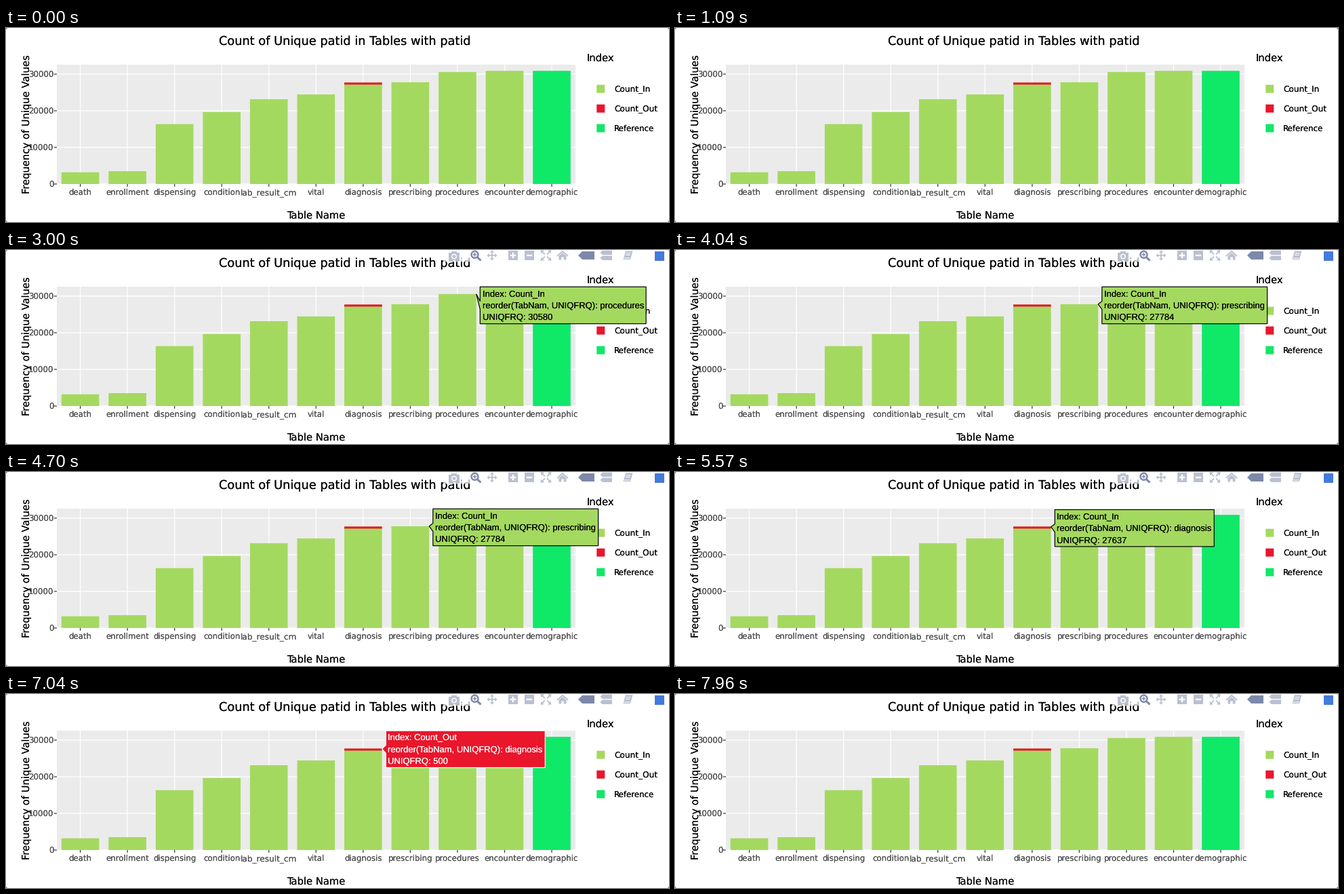
A matplotlib script for the animation above (8000 ms loop, 978 px wide and 286 px high).

```python
import matplotlib.pyplot as plt
from matplotlib.animation import FuncAnimation
from matplotlib.patches import Circle, FancyBboxPatch, Polygon, Rectangle

W, H, DPI = 978, 286, 64
PT = 72 / DPI  # points per pixel
STEP, LOOP = 40, 8000

LIME, RED, GREEN = "#a4d960", "#e9162c", "#10e868"
INK, TICK = "#000000", "#4d4d4d"
SOFT, ACTIVE, BLUE = "#b9c0d0", "#7d89aa", "#447adb"

LEFT, RIGHT, TOP, BASE = 75, 840, 54, 230
SLOT = (RIGHT - LEFT) / 11
BAR_W = 0.8 * SLOT
UNIT = 162 / 30000  # pixels per counted value
TITLE, AXIS, LABEL, LEGEND = 17.78, 14.8, 11.8, 12.1  # text sizes in pixels

plt.rcParams["text.hinting"] = "none"
plt.rcParams["font.family"] = "DejaVu Sans"

fig = plt.figure(figsize=(W / DPI, H / DPI), dpi=DPI, facecolor="#777777")
ax = fig.add_axes([0, 0, 1, 1])
ax.set_xlim(0, W)
ax.set_ylim(H, 0)
ax.axis("off")


def rect(x0, y0, x1, y1, color, z=1):
    return ax.add_patch(Rectangle((x0, y0), x1 - x0, y1 - y0, fc=color, lw=0,
                                  zorder=z, snap=False))


def poly(points, color, z=1, edge="none", lw=0):
    return ax.add_patch(Polygon(points, fc=color, ec=edge, lw=lw * PT, zorder=z, joinstyle="miter"))


def line(xs, ys, color, lw, z=1):
    return ax.plot(xs, ys, color=color, lw=lw * PT, zorder=z, solid_capstyle="butt", snap=False)[0]


def text(x, y, s, px, color=INK, ha="left", z=4, **kw):
    # Two passes firm up the antialiased strokes.
    return [ax.text(x, y, s, fontsize=px * PT, color=color, ha=ha, va="baseline", zorder=z, **kw)
            for _ in range(2)]


def value_y(v):
    return BASE - v * UNIT


def centre(i):
    return LEFT + (i + 0.5) * SLOT - 0.2


# ---- chart ----
ax.add_patch(FancyBboxPatch((0, 0), W, H, boxstyle="round,pad=0,rounding_size=3.5",
                            fc="white", lw=0, zorder=0))
rect(LEFT, TOP, RIGHT, BASE, "#ebebeb")

BARS = [("death", 3200), ("enrollment", 3500), ("dispensing", 16350),
        ("condition", 19650), ("lab_result_cm", 23150), ("vital", 24450),
        ("diagnosis", 27637), ("prescribing", 27784), ("procedures", 30580),
        ("encounter", 30900), ("demographic", 30900)]

for v in (0, 10000, 20000, 30000):
    y = value_y(v)
    line([LEFT, RIGHT], [y, y], "white", 1.33, 2)
    line([LEFT - 4, LEFT], [y, y], "#333333", 1.2, 2)
    text(70.5, y + 5, str(v), LABEL, TICK, "right")

for i, (name, count) in enumerate(BARS):
    x = centre(i)
    line([x, x], [TOP, BASE], "white", 1.33, 2)
    line([x, x], [BASE, BASE + 4], "#333333", 1.2, 2)
    color = GREEN if name == "demographic" else LIME
    rect(x - BAR_W / 2, value_y(count), x + BAR_W / 2, BASE, color, 3)
    if name == "diagnosis":
        rect(x - BAR_W / 2, value_y(count) - 0.4, x + BAR_W / 2, value_y(count - 500), RED, 3)
    text(x, 246, name, LEGEND if "_" in name else LABEL, TICK, "center")

text(500, 25, "Count of Unique patid in Tables with patid", TITLE, ha="center")
text(457.5, 281, "Table Name", AXIS, ha="center")
text(35, 243.5, "Frequency of Unique Values", AXIS, rotation=90, rotation_mode="anchor")

text(857, 49, "Index", AXIS)
for i, (name, color) in enumerate([("Count_In", LIME), ("Count_Out", RED), ("Reference", GREEN)]):
    y = 89.7 + 29 * i
    rect(871.3, y - 6, 883.3, y + 6, color)
    text(897, round(y + 4), name, LEGEND if "_" in name else LABEL)


# ---- toolbar ----
def ring(x, y, r, color, lw):
    return ax.add_patch(Circle((x, y), r, fc="none", ec=color, lw=lw * PT, zorder=6))


def plus(x, y, r, color, lw, upright=True):
    parts = [line([x - r, x + r], [y, y], color, lw, 7)]
    if upright:
        parts.append(line([x, x], [y - r, y + r], color, lw, 7))
    return parts


def arrow_head(x, y, dx, dy, size, color):
    px, py = -dy, dx
    return poly([(x, y), (x - size * (dx - px), y - size * (dy - py)),
                 (x - size * (dx + px), y - size * (dy + py))], color, 6)


def tag(x0, x1, y, half, color):
    neck = x0 + half
    return poly([(x0, y), (neck, y - half), (x1, y - half), (x1, y + half), (neck, y + half)], color, 6)


def toolbar():
    parts = [rect(645, 0, W, 17.5, "white", 5)]
    # camera
    parts += [rect(653, 4, 669, 15, SOFT, 6), rect(657, 2, 665, 5, SOFT, 6),
              ring(661, 9.5, 3.2, "white", 1.5)]
    # magnifier
    parts += [ring(691.5, 6.8, 5, ACTIVE, 2.4), line([695, 700.5], [10.5, 15.5], ACTIVE, 3, 6)]
    parts += plus(691.5, 6.8, 2.8, ACTIVE, 1.5)
    # pan
    parts += plus(717, 8, 5.5, SOFT, 1.8)
    for dx, dy in ((1, 0), (-1, 0), (0, 1), (0, -1)):
        parts.append(arrow_head(717 + 7.5 * dx, 8 + 7.5 * dy, dx, dy, 3.2, SOFT))
    # zoom in and out
    for x, upright in ((748, True), (772, False)):
        parts.append(rect(x - 7, 1, x + 7, 15, SOFT, 6))
        parts += plus(x, 8, 4.2, "white", 2.4, upright)
    # autoscale
    for sx in (-1, 1):
        for sy in (-1, 1):
            x, y = 796.5 + 7.5 * sx, 8 + 7.5 * sy
            parts.append(line([x, x - 6 * sx], [y, y - 6 * sy], SOFT, 1.8, 6))
            parts.append(poly([(x, y), (x - 5 * sx, y), (x, y - 5 * sy)], SOFT, 6))
    # home
    parts += [line([813, 821, 829], [9, 2, 9], SOFT, 2, 6),
              poly([(815.5, 9), (821, 4.3), (826.5, 9), (826.5, 14.5), (822.8, 14.5),
                    (822.8, 10.5), (819.2, 10.5), (819.2, 14.5), (815.5, 14.5)], SOFT, 6)]
    # hover modes
    parts += [tag(844, 868, 8, 6, ACTIVE), tag(876.5, 894, 4, 3.2, SOFT), tag(876.5, 894, 11.8, 3.2, SOFT)]
    # book
    parts += [poly([(914, 1.5), (924.5, 1.5), (921, 14), (910.5, 14)], SOFT, 6),
              line([914.5, 921.5], [4.8, 4.8], "white", 1, 7),
              line([913.7, 920.7], [7.4, 7.4], "white", 1, 7),
              line([911.5, 920.5], [12, 12], "white", 1, 7)]
    parts.append(rect(957, 2, 971, 16, BLUE, 6))
    return parts


# ---- hover labels ----
def hover(bar, index, count, width, mid, fill, ink):
    name, top = BARS[bar]
    tip = (centre(bar) + BAR_W / 2, value_y(top))
    x0, half = tip[0] + 5.6, 27.2
    x1 = x0 + width
    shape = [tip, (x0, mid + 6), (x0, mid + half), (x1, mid + half),
             (x1, mid - half), (x0, mid - half), (x0, mid - 6)]
    rows = [f"Index: {index}", f"reorder(TabNam, UNIQFRQ): {name}", f"UNIQFRQ: {count}"]
    parts = [poly(shape, fill, 8, ink, 1.2)]
    for i, row in enumerate(rows):
        parts += text(x0 + 3.2, mid - 12.5 + 17 * i, row, 13, ink, z=9, family="Liberation Sans")
    return parts


BAR_PARTS = toolbar()
LABELS = [
    (2720, 3640, hover(8, "Count_In", 30580, 244.8, 81.5, LIME, INK)),
    (3640, 4920, hover(7, "Count_In", 27784, 243.8, 81.5, LIME, INK)),
    (4920, 5920, hover(6, "Count_In", 27637, 235, 82.7, LIME, INK)),
    (5920, 7200, hover(6, "Count_Out", 500, 235, 81.3, RED, "white")),
]


def draw(k):
    t = k * STEP
    fade = min(max((t - 2360) / 300, 0), 1)
    for i, part in enumerate(BAR_PARTS):
        part.set_visible(fade > 0)
        part.set_alpha(fade * (0.7 if i == 0 else 1))
    for start, end, parts in LABELS:
        for part in parts:
            part.set_visible(start <= t < end)
    return []


anim = FuncAnimation(fig, draw, frames=LOOP // STEP, interval=STEP, repeat=True,
                     repeat_delay=0, init_func=lambda: draw(0))
plt.show()
```
